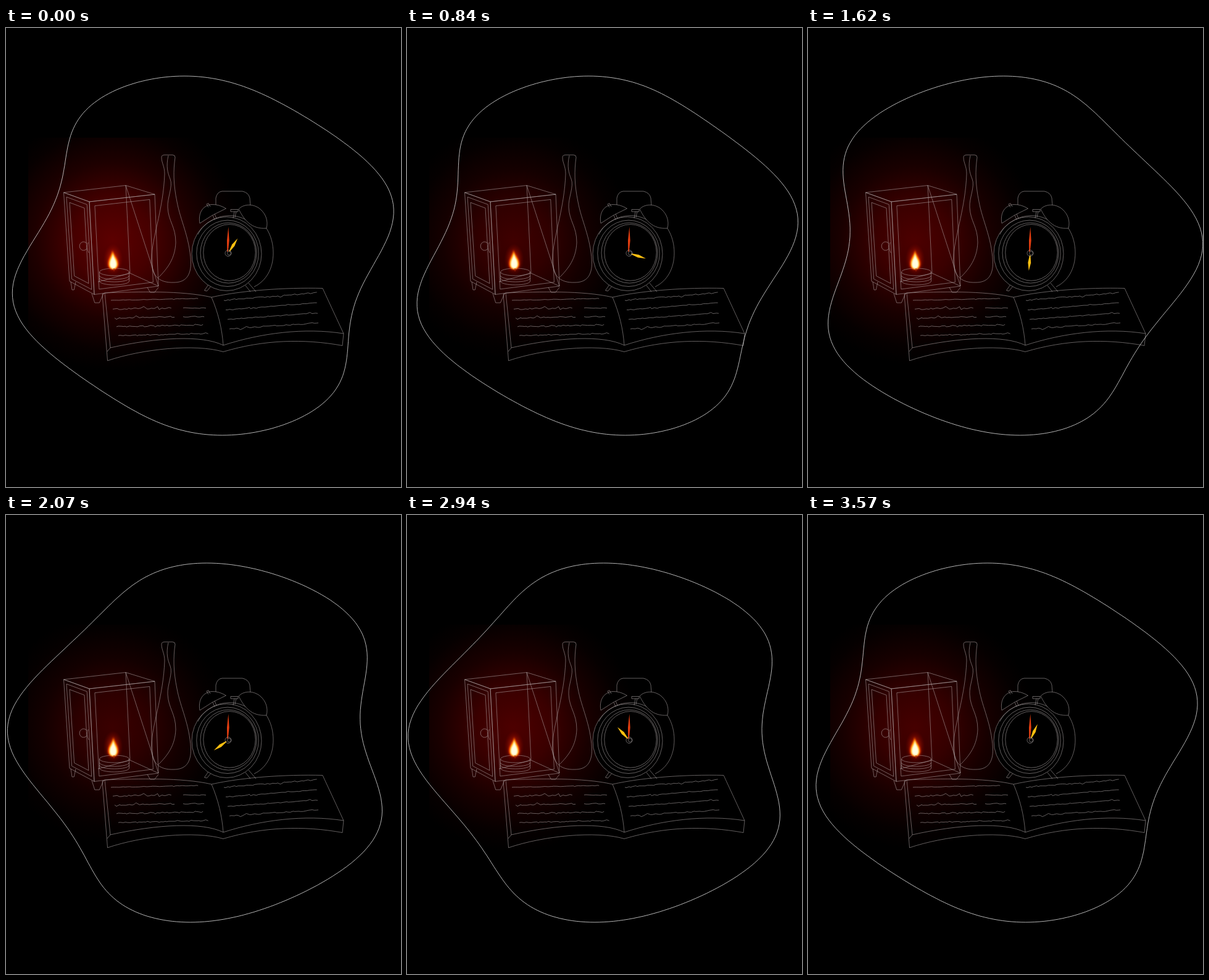
These frames come from a looping animation (640 px wide and 745 px high, 3600 ms). An HTML page:

```html
<!DOCTYPE html>
<html lang="en">
<head>
<meta charset="utf-8">
<title>Candle and clock</title>
<style>
html, body { margin: 0; width: 100%; height: 100%; overflow: hidden; background: #000; }
svg { display: block; width: 640px; height: 745px; }
.art { fill: none; stroke: #b4acac; stroke-width: .55; stroke-linejoin: round; }
.solid { fill: #000; }
</style>
</head>
<body>
<svg viewBox="0 0 640 745">
  <defs>
    <radialGradient id="red" gradientUnits="userSpaceOnUse" cx="173" cy="345" r="210">
      <stop offset="0" stop-color="#5c0000"/>
      <stop offset=".3" stop-color="#460000"/>
      <stop offset=".6" stop-color="#1e0000"/>
      <stop offset=".85" stop-color="#070000"/>
      <stop offset="1" stop-color="#000"/>
    </radialGradient>
    <radialGradient id="halo">
      <stop offset="0" stop-color="#ff5a00" stop-opacity=".9"/>
      <stop offset=".5" stop-color="#d02000" stop-opacity=".4"/>
      <stop offset="1" stop-color="#900000" stop-opacity="0"/>
    </radialGradient>
    <filter id="soft" x="-60%" y="-60%" width="220%" height="220%"><feGaussianBlur stdDeviation="1.6"/></filter>
    <filter id="fine" x="-60%" y="-60%" width="220%" height="220%"><feGaussianBlur stdDeviation=".9"/></filter>
  </defs>
  <rect width="640" height="745"/>
  <rect id="glow" x="36" y="178" width="360" height="392" fill="url(#red)"/>
  <path id="lantern" class="art"/>
  <path id="bottle" class="art" d="M252 210Q252 206 257 206H270Q274 206 274 210C271 231 271 253 277 282C283 314 297 338 299.500 379C300 402 291 413 272 413C247 414 235 401 235.500 375C237 338 255 294 257 237C257 224 252 219 252 210M263 207C259 225 262 235 266 245C271 257 261 276 262 291C263 314 275 322 275 348C274 374 262 390 247 405"/>

  <g class="art">
    <path d="M340 289V276Q342 266 350 265H383Q393 267 395 276L396 288M395 303C419 312 433 337 433 365C433 391 421 411 402 420"/>
    <path d="M329 415L321.500 426L325.500 427L333 418M388 418L396 428M393 414L405 428"/>
    <g id="rings"></g>
    <path d="M311 335C325 306 371 291 402 321"/>
    <path class="solid" d="M314 317C311 300 319 288 333 286.500Q345 286 356.500 293Q335 302 314 317Z"/>
    <path class="solid" d="M377 294C384 286 400 284 412 294C421 302 425 313 422 325C398 327 386 312 377 294Z"/>
    <path d="M331 290L328 284.500L325 286L328 291M335 304L338 311M338 302L341 309M364 294.500H376V298H364ZM370 298L368 309M373 298L371 307"/>
  </g>

  <path id="hour" d="M359.300 362L357.600 350L360 337L362.400 350L360.700 362Z" fill="#ffc010"/>
  <path d="M360.300 323L361.700 345L359.800 363H358.300L358 345Z" fill="#e43e10"/>
  <g class="art"><circle cx="360" cy="365.500" r="5"/><circle cx="361.500" cy="365.500" r="3"/></g>

  <g class="art">
    <path d="M160 430C215 428 285 426 333 437C382 426 451 421 513 422.500L547 496C484 486 413 495 352 515C318 498 245 502 169 519ZM333 437C344 463 350 488 352 515"/>
    <path d="M160 430L156 432L164.500 540C220 521 306 512 352 525.500C417 506 482 504 545 515.500L547 496M164 525L169 519"/>
    <path id="writing"/>
  </g>

  <ellipse cx="173.500" cy="376" rx="16" ry="26" fill="url(#halo)"/>
  <path id="outer" fill="#ff3a00" filter="url(#soft)"/>
  <path id="middle" fill="#ffb400" filter="url(#fine)"/>
  <path id="core" fill="#fffde0" filter="url(#fine)"/>
  <path d="M175 390V395" stroke="#a32205"/>
  <path id="blob" fill="none" stroke="#d4d4d4" stroke-width=".85"/>
</svg>
<script>
const LOOP = 3600, WAVE = 900, TICK = 300, FLICKER = 1320;
const TURN = 2 * Math.PI;
const $ = id => document.getElementById(id);
const shape = (id, d) => $(id).setAttribute("d", d);
const mix = (a, b, p) => a + (b - a) * p;
const between = (a, b, p) => [mix(a[0], b[0], p), mix(a[1], b[1], p)];
const polygon = pts => "M" + pts.map(p => p.map(n => n.toFixed(1)).join(" ")).join("L") + "Z";

let seed = 11;
const random = () => (seed = seed * 16807 % 2147483647) / 2147483647;

// A four-cornered face, shrunk towards its middle.
function face([a, b, c, d], u, v) {
  const at = (x, y) => between(between(a, b, x), between(d, c, x), y);
  return polygon([at(u, v), at(1 - u, v), at(1 - u, 1 - v), at(u, 1 - v)]);
}

function foot(x, y, w, h) {
  return `M${x} ${y}l${w * .25} ${h}h${w * .4}l${w * .35} ${-h}`;
}

function lanternPath() {
  const left = [93.5, 267], back = [194, 255.5], right = [241, 270], front = [135, 282];
  const lowLeft = [103, 411], lowFront = [143, 432.5], lowRight = [247, 419], lowBack = [201, 398];
  const door = [left, front, lowFront, lowLeft], pane = [front, right, lowRight, lowFront];
  let d = polygon([left, back, right, front]) + polygon([back, lowBack, lowRight]);
  d += face(door, 0, 0) + face(door, .1, .04) + face(door, .21, .09);
  d += face(pane, 0, 0) + face(pane, .08, .05) + "M201 398L149 412";
  d += foot(105, 412, 8, 13) + foot(139, 431, 19, 15) + foot(229, 421, 18, 8);
  d += "M131 350A6.500 7 0 1 0 131 358M133 348Q130 356 134 365";
  // candle cup
  d += "M151.500 396a24 6 0 1 1 48 0a24 6 0 1 1 -48 0V411M199.500 396V411";
  for (const y of [402, 406, 411]) d += `M151.500 ${y}a24 6 0 0 0 48 0`;
  return d;
}

function ringMarkup() {
  let out = "";
  for (let i = 0; i < 4; i++) {
    const x = 357.5 + i * 1.5, rx = 56.5 - i * 7 + i * i * .75;
    out += `<ellipse class="solid" cx="${x}" cy="${366.5 - i * .7}" rx="${rx}" ry="${rx + 3.5}"/>`;
  }
  return out;
}

function scribble(x0, y0, x1, y1) {
  const rough = 1 + random() * 2;
  let d = `M${x0} ${y0}`;
  for (let x = x0 + 3; x < x1; x += 2 + random() * 4) {
    const jump = random() < .15 ? 2.6 : .8;
    const y = mix(y0, y1, (x - x0) / (x1 - x0)) + (random() - .5) * rough * jump;
    d += `L${x.toFixed(1)} ${y.toFixed(1)}`;
  }
  return d;
}

function writingPath() {
  let d = "";
  for (let i = 0; i < 5; i++) {
    const x = 170 + i * 3, y = 442 + i * 14.3, end = 312 + i * 4;
    if (i === 1 || i === 2) d += scribble(x, y, 262 + i * 7, y - 2) + scribble(287, y - 2, 325, y - 2);
    else d += scribble(x, y, end, y - 3);
    if (i < 4) d += scribble(353 + i * 3, 442 + i * 15.5, 507, 429.500 + i * 16.3);
  }
  return d;
}

// An ellipse whose rows are pushed sideways by a travelling sine.
function blobPath(t) {
  const pts = [], phase = TURN * (t / WAVE + .02);
  for (let i = 0; i < 240; i++) {
    const a = TURN * i / 240, up = 291.5 * Math.sin(a);
    const push = 32.5 * Math.sin(TURN * up / 364.4 - phase);
    pts.push([321 + 287 * Math.cos(a) + push, 369.5 - up]);
  }
  return polygon(pts);
}

function tear(top, bottom, w, lean) {
  const x = 173.7, h = bottom - top, tip = x + lean, low = bottom - h * .3;
  return `M${tip} ${top}C${tip + 1} ${top + h * .3} ${x + w} ${top + h * .4} ${x + w} ${low}` +
    `C${x + w} ${bottom + 2} ${x - w} ${bottom + 2} ${x - w} ${low}` +
    `C${x - w} ${top + h * .4} ${tip - 1} ${top + h * .3} ${tip} ${top}Z`;
}

// Each hour starts slowly and snaps to the next.
function hourAngle(t) {
  const n = Math.floor(t / TICK), p = t / TICK - n;
  return 32.5 + 30 * (n + p ** 3);
}

function draw(t) {
  const light = .5 + .5 * Math.cos(TURN * t / FLICKER);
  const lean = -Math.cos(TURN * t / WAVE), top = 360 + Math.sin(TURN * t / 450) * .6;
  shape("blob", blobPath(t));
  $("hour").setAttribute("transform", `rotate(${hourAngle(t)} 360 365.5)`);
  $("glow").setAttribute("opacity", mix(.62, 1, light));
  $("red").setAttribute("r", mix(188, 212, light));
  shape("outer", tear(top, 393, 8.5, lean));
  shape("middle", tear(top + 2, 392, 7, lean));
  shape("core", tear(top + 6, 391, 5.6, lean / 2));
}

shape("lantern", lanternPath());
shape("writing", writingPath());
$("rings").innerHTML = ringMarkup();

const start = performance.now();
function tick(now) {
  draw(Math.max(0, now - start) % LOOP);
  requestAnimationFrame(tick);
}
draw(0);
requestAnimationFrame(tick);
</script>
</body>
</html>
```
